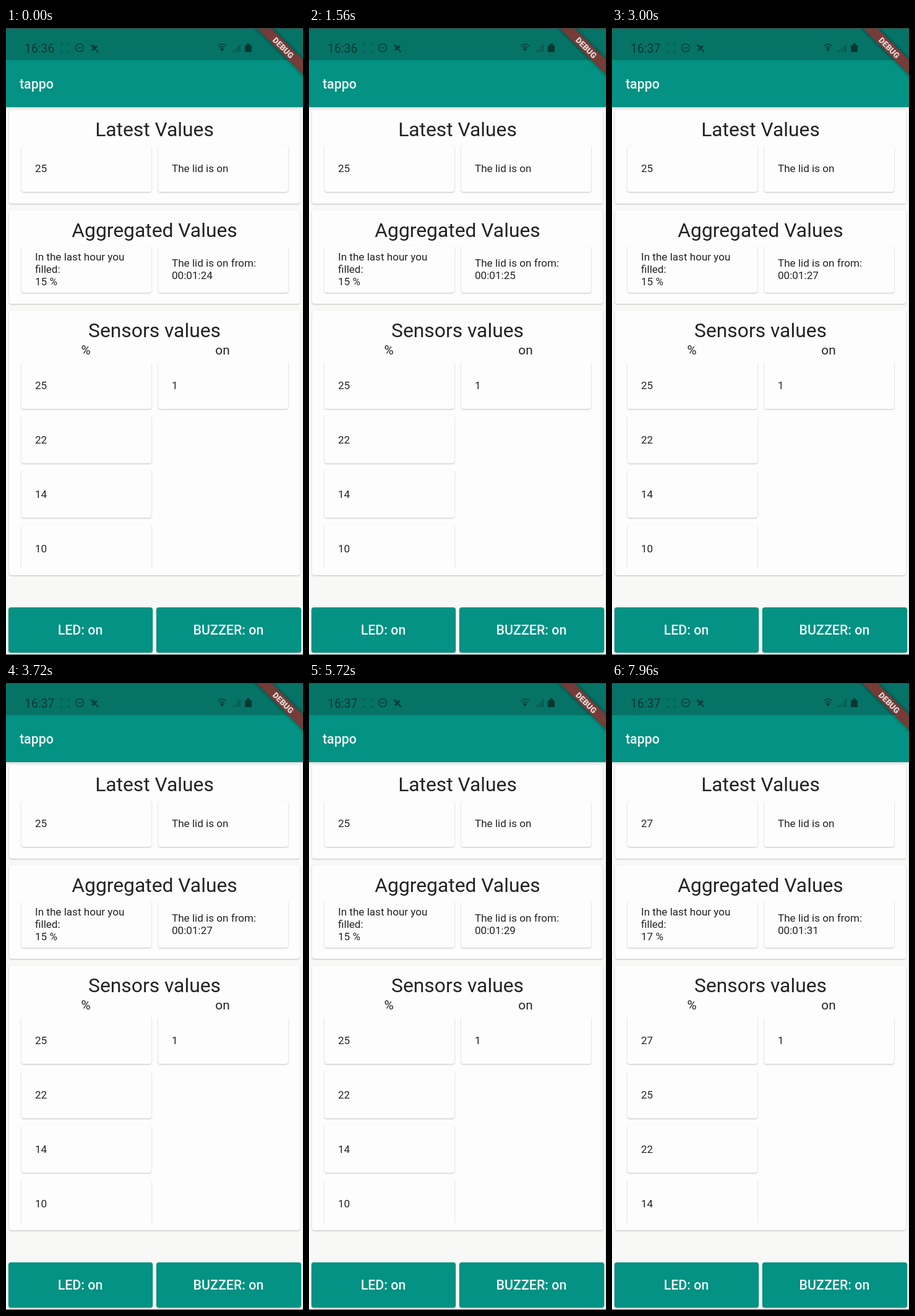
An HTML page for the animation above (8 s loop, 480 by 1014 pixels).

```html
<!DOCTYPE html>
<html lang="en">
<head>
<meta charset="utf-8">
<title>tappo</title>
<style>
html, body { margin: 0; width: 100%; height: 100%; overflow: hidden; background: #f8f8f7; }
svg { display: block; width: 100vw; height: 100vh; font-family: Roboto, sans-serif; }
text { fill: #232323; font-size: 17.1px; }
.title { font-size: 31.8px; text-anchor: middle; }
.head { font-size: 20.8px; text-anchor: middle; }
.light { font-size: 21.4px; font-weight: 500; fill: #f0faf8; }
.mid { text-anchor: middle; }
.card { fill: #fdfdfe; filter: drop-shadow(0 1px 1px rgba(0, 0, 0, .24)); }
.button { fill: #039283; filter: drop-shadow(0 1px 1px rgba(0, 0, 0, .4)); }
#clock { font-size: 19.4px; fill: #063832; }
</style>
</head>
<body>
<svg viewBox="0 0 480 1014" preserveAspectRatio="none">
  <defs><clipPath id="list"><path d="M0 541H480V873H0Z"/></clipPath></defs>
  <rect width="480" height="1014" fill="#f8f8f7"/>
  <g id="cards"></g>

  <rect y="52" width="480" height="76" fill="#039283"
        style="filter: drop-shadow(0 1px 2px rgba(0, 0, 0, .2))"/>
  <rect width="480" height="52" fill="#067367"/>
  <text class="light" x="22" y="97.5">tappo</text>

  <text id="clock" x="30" y="39.5"></text>
  <g fill="none" stroke="#063f38" stroke-width="1.5">
    <path d="M89 29V26H92M99 26H102V29M102 36V39H99M92 39H89V36" opacity=".5"/>
    <circle cx="119" cy="32" r="6.5"/>
    <path d="M115.500 32H122.500"/>
    <path d="M137 27L149 39" stroke-width="2"/>
    <path d="M139 36L147 29M139 28L144 32" stroke-width="3"/>
    <path d="M342 29Q349 23 356 29M344.500 32Q349 28 353.500 32"/>
    <path d="M367 39V36M371 39V33M375 39V29M378 39V26" opacity=".65"/>
  </g>
  <path d="M346 34Q349 31 352 34L349 38ZM386 28H389V25H394V28H397V39H386Z" fill="#063832"/>

  <g transform="translate(448 32) rotate(45)">
    <rect x="-90" y="-9" width="180" height="17" fill="#753c38"
          style="filter: drop-shadow(0 0 3px rgba(0, 0, 0, .5))"/>
    <text class="mid" y="4.600" style="font-size: 13px; font-weight: 900; fill: #e6dcda">DEBUG</text>
  </g>

  <g id="labels"></g>
  <path d="M0 .5H480M0 1013.500H480" stroke="#3a4543"/>
  <path d="M479.500 128V1013" stroke="#dcdcdc"/>
</svg>
<script>
const LOOP = 8000, LEFT = 25, RIGHT = 246;
const FIRST_TICK = 945, TICK = 1003, NEW_MINUTE = 2620;
const rows = [0, 1, 2, 3].map(i => 539 + 88 * i);
const byId = id => document.getElementById(id);

function add(parent, tag, attrs, content = '') {
  const el = document.createElementNS('http://www.w3.org/2000/svg', tag);
  for (const name in attrs) el.setAttribute(name, attrs[name]);
  el.textContent = content;
  return parent.appendChild(el);
}
const box = (x, y, width, height, cls = 'card', parent = byId('cards')) =>
  add(parent, 'rect', { x, y, width, height, rx: 4, class: cls });
const label = (x, y, content, cls = '') =>
  add(byId('labels'), 'text', { x, y, class: cls }, content);

box(5, 133, 470, 151);
box(5, 295, 470, 151);
box(5, 457, 470, 428);
for (const x of [LEFT, RIGHT]) {
  box(x, 190, 210, 75);
  box(x, 352, 210, 76);
}
const list = add(byId('cards'), 'g', { 'clip-path': 'url(#list)' });
rows.forEach(y => box(LEFT, y, 210, 77, 'card', list));
box(RIGHT, rows[0], 210, 77, 'card', list);
box(4, 937, 233, 73, 'button');
box(243, 937, 234, 73, 'button');

label(240, 175, 'Latest Values', 'title');
label(240, 338, 'Aggregated Values', 'title');
label(240, 500, 'Sensors values', 'title');
label(129, 528, '%', 'head');
label(350, 528, 'on', 'head');
label(268, 233, 'The lid is on');
label(47, 376, 'In the last hour you');
label(47, 396, 'filled:');
label(268, 386, 'The lid is on from:');
label(268, 584, '1');
label(120, 981, 'LED: on', 'light mid');
label(359.5, 981, 'BUZZER: on', 'light mid');

const latest = label(47, 233);
const filled = label(47, 416);
const timer = label(268, 406);
const readings = rows.map(y => label(47, y + 45));

function setText(el, value) {
  if (el.textContent !== String(value)) el.textContent = value;
}

function draw(now) {
  const t = now % LOOP;
  const seconds = 25 + Math.floor((t - FIRST_TICK) / TICK);
  const updated = seconds >= 31;
  const values = updated ? [27, 25, 22, 14] : [25, 22, 14, 10];
  setText(byId('clock'), t < NEW_MINUTE ? '16:36' : '16:37');
  setText(timer, '00:01:' + seconds);
  setText(latest, values[0]);
  setText(filled, (updated ? 17 : 15) + ' %');
  readings.forEach((el, i) => setText(el, values[i]));
  requestAnimationFrame(draw);
}
draw(0);
</script>
</body>
</html>
```
